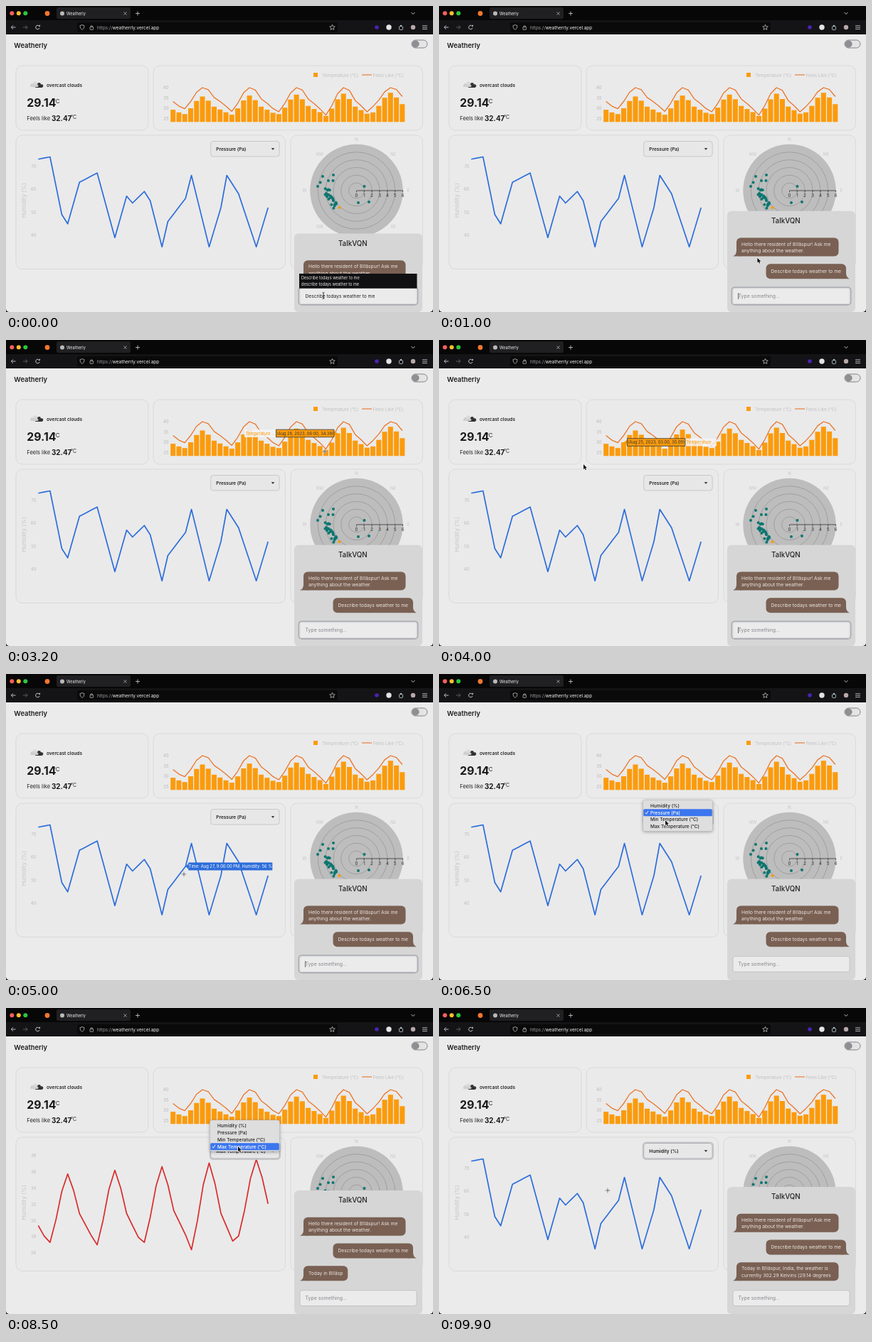
An HTML page with a canvas that plays this animation: 600 px wide and 431 px high, repeating every 10000 ms.

```html
<!DOCTYPE html>
<html lang="en">
<head>
<meta charset="utf-8">
<title>Weatherly</title>
<style>
html, body { margin: 0; width: 100%; height: 100%; overflow: hidden; background: #ebebeb; }
canvas { display: block; width: 600px; height: 431px; }
</style>
</head>
<body>
<canvas id="stage"></canvas>
<script>
const canvas = document.getElementById('stage');
const dpr = window.devicePixelRatio || 1;
canvas.width = Math.round(600 * dpr);
canvas.height = Math.round(431 * dpr);
const c = canvas.getContext('2d');
const LOOP = 10000, STEP = 100, COUNT = 40;
const ORANGE = '#fb9b0c', EMBER = '#e8762a', TEAL = '#0d7670', BLUE = '#2d6ddb', RED = '#d92b2b', BROWN = '#796053';

// eight samples a day: a daily shape between that day's low and high
function daily(lows, high, shape) {
  return Array.from({ length: COUNT }, (_, i) => {
    const day = Math.floor((i + 6) / 8);
    return lows[day] + (high(day) - lows[day]) * shape[(i + 6) % 8];
  });
}
const temps = daily([27.3, 27.3, 27, 27.3, 26.4, 28.1], d => 35.3 + 0.45 * d, [0, 0.33, 0.746, 1, 0.76, 0.42, 0.26, 0.1]);
const feels = daily([29.9, 29.9, 28.6, 28.4, 26.8, 30.9], () => 40, [0, 0.34, 0.78, 1, 0.9, 0.53, 0.34, 0.12]);

// turning points of the humidity curve: index, percent
const turns = [[0, 73], [2, 74], [4, 49], [5, 45], [7, 63], [10, 67], [13, 39], [15, 57], [16, 54], [18, 59], [19, 55],
  [21, 35], [22, 46], [25, 56], [26, 66], [29, 35], [31, 52], [32, 66], [34, 58], [37, 35], [39, 52]];
const humid = Array.from({ length: COUNT }, (_, i) => along(turns, i)[0]);

let seed = 11;
const rnd = () => (seed = seed * 16807 % 2147483647) / 2147483647;
const wind = [[441.6, 248.4], [445, 240], [460, 238], [459.5, 246], [453, 246], [438, 254], [503.5, 254], [495, 277], [510, 276]];
for (let i = 0; i < 24; i++) {
  const u = rnd();
  wind.push([449 + 13 * u + 6 * (rnd() - 0.5), 260 + 20 * u + 14 * (rnd() - 0.5)]);
}

const options = ['Humidity (%)', 'Pressure (Pa)', 'Min Temperature (°C)', 'Max Temperature (°C)'];
const prompt = 'Describe todays weather to me';
const greeting = ['Hello there resident of Bīlāspur! Ask me', 'anything about the weather.'];
const answer = ['Today in Bīlāspur, India, the weather is', 'currently 302.29 Kelvins (29.14 degrees'];

// pointer stops: time, x, y
const path = [[0, 446, 408], [700, 446, 408], [1600, 450, 248], [2000, 438, 256], [2700, 520, 155], [3200, 448, 157],
  [3900, 262, 150], [4200, 85, 225], [4900, 249, 279], [5000, 250, 282], [5800, 335, 202], [6400, 319, 197],
  [6500, 318, 206], [6800, 318, 206], [7400, 328, 197], [7800, 328, 206], [8400, 326, 195], [8600, 326, 195],
  [9100, 322, 167], [9900, 237, 257]];
// menu openings: from, to, checked option
const menus = [[6000, 6800, 1], [7300, 7800, 2], [8400, 9100, 3]];

const px = i => 45.3 + i * 8.28;
const bx = i => 234.7 + i * 8.26;
const tempY = v => 115 + (40 - v) * 2.93;
const humidY = v => 225.5 + (70 - v) * 3.25;
const redY = v => 208 + (38 - v) * 11.42;

// linear values between stops whose first entry is the position
function along(stops, at) {
  const k = Math.max(1, stops.findIndex(s => s[0] >= at));
  const a = stops[k - 1], b = stops[k], u = Math.max(0, (at - a[0]) / (b[0] - a[0]));
  return a.slice(1).map((v, i) => v + (b[i + 1] - v) * u);
}
function pointer(t) {
  const [x, y] = along(path, t);
  return { x, y };
}
function text(s, x, y, size, color, weight = 400, align = 'left') {
  c.font = `${weight} ${size}px Inter, Roboto, sans-serif`;
  c.textAlign = align;
  c.textBaseline = 'alphabetic';
  c.fillStyle = color;
  c.fillText(s, x, y + size * 0.36);
  return c.measureText(s).width;
}
function paint(fill, stroke, lw) {
  if (fill) { c.fillStyle = fill; c.fill(); }
  if (stroke) { c.strokeStyle = stroke; c.lineWidth = lw; c.stroke(); }
}
function box(x, y, w, h, r, fill, stroke, lw = 1) {
  c.beginPath();
  c.roundRect(x, y, w, h, r);
  paint(fill, stroke, lw);
}
function dot(x, y, r, fill, stroke, lw = 1) {
  c.beginPath();
  c.arc(x, y, r, 0, 7);
  paint(fill, stroke, lw);
}
function line(pts, color, lw = 1) {
  c.beginPath();
  pts.forEach(p => c.lineTo(p[0], p[1]));
  c.lineJoin = 'round';
  paint(null, color, lw);
}
function poly(pts, fill) {
  c.beginPath();
  pts.forEach(p => c.lineTo(p[0], p[1]));
  paint(fill);
}
function plus(x, y, r, color, lw) {
  line([[x - r, y], [x + r, y]], color, lw);
  line([[x, y - r], [x, y + r]], color, lw);
}
function nearest(n, dist) {
  let best = 0;
  for (let i = 1; i < n; i++) if (dist(i) < dist(best)) best = i;
  return best;
}
function stamp(i) {
  const d = new Date(2023, 7, 24, 18 + 3 * i), h = d.getHours();
  return { day: 'Aug ' + d.getDate(), clock: `${h % 12 || 12}:00:00 ${h < 12 ? 'AM' : 'PM'}`, h24: String(h).padStart(2, '0') + ':00' };
}
const zone = (p, x0, y0, x1, y1) => p.x >= x0 && p.x <= x1 && p.y >= y0 && p.y <= y1;
const overBars = p => zone(p, 231, 108, 561, 164);
const overLine = p => zone(p, 43, 205, 370, 345) && !zone(p, 287, 190, 385, 212);
const overPolar = (p, top) => zone(p, 405, 190, 585, top);

function arrow(x, y, dir, color) {
  line([[x - 3 * dir, y], [x + 3 * dir, y]], color, 0.9);
  line([[x + 0.5 * dir, y - 2.7], [x + 3.2 * dir, y], [x + 0.5 * dir, y + 2.7]], color, 0.9);
}

function browser() {
  const ink = '#d4d4d6';
  c.fillStyle = '#070708';
  c.fillRect(0, 0, 600, 40);
  c.fillStyle = '#141416';
  c.fillRect(0, 20, 600, 20);
  ['#f9605a', '#fbbd2e', '#2ac840'].forEach((k, i) => dot(8.3 + i * 9.5, 10.3, 3, k));
  dot(58, 10.5, 3.4, '#f2762e');
  box(71, 2, 104, 16, 2.5, '#202022');
  dot(79, 10.5, 3, '#b9b9b9');
  text('Weatherly', 85, 10.5, 5.6, '#f0f0f0');
  line([[165.5, 8.5], [169.5, 12.5]], ink, 0.7);
  line([[169.5, 8.5], [165.5, 12.5]], ink, 0.7);
  plus(185, 10.5, 3, ink, 0.8);
  line([[569.5, 9], [572, 11.5], [574.5, 9]], ink, 0.9);
  arrow(10.5, 30, -1, ink);
  arrow(27, 30, 1, '#66666a');
  c.beginPath();
  c.arc(44.5, 30, 2.8, 0.3, 5.6);
  paint(null, ink, 0.9);
  poly([[45.5, 28.8], [48, 28.8], [48, 26.2]], ink);
  box(100, 23, 366, 14, 2.5, '#0a0a0b');
  line([[107, 26.6], [110, 27.6], [109.5, 31], [107, 33.6], [104.5, 31], [104, 27.6], [107, 26.6]], ink, 0.7);
  box(118, 29.5, 4.6, 3.8, 0.7, null, ink, 0.7);
  c.beginPath();
  c.arc(120.3, 29.2, 1.5, Math.PI, 0);
  paint(null, ink, 0.7);
  const w = text('https://', 128, 30.2, 6.4, '#9c9ca0');
  text('weatherrly.vercel.app', 128 + w, 30.2, 6.4, '#f4f4f4');
  line(Array.from({ length: 11 }, (_, i) => {
    const a = i * Math.PI / 5, r = i % 2 ? 1.8 : 4;
    return [458.5 + r * Math.sin(a), 30.2 - r * Math.cos(a)];
  }), ink, 0.7);
  dot(521, 30, 2.8, '#4a23b5');
  dot(538, 30, 3.7, '#e4e4e4');
  box(552.5, 28.5, 5, 5, 1, null, '#b8c8c8', 0.9);
  dot(555, 28, 1.2, '#b8c8c8');
  dot(572, 30, 3.2, '#b9a9a9');
  [27.8, 30.2, 32.6].forEach(y => line([[585, y], [592, y]], ink, 0.8));
}

function page() {
  c.fillStyle = '#ebebeb';
  c.fillRect(0, 40, 600, 391);
  text('Weatherly', 11.3, 55.2, 9.4, '#1c1c1e', 600);
  box(570, 48, 22, 11, 5.5, '#e4e4e4', '#77777b', 0.9);
  dot(575.6, 53.5, 4.6, '#8f8f93', '#77777b', 0.6);
  [[14, 84, 186, 91], [207, 84, 378.5, 91], [14, 182, 378.5, 188.5], [400, 182, 185.5, 188.5]]
    .forEach(r => box(...r, 9, '#eaeaea', '#d7d7d7', 0.9));
  box(40, 110.3, 12.3, 4.6, 2.3, '#333');
  dot(46.5, 110.5, 2.4, '#333');
  dot(37, 111.3, 2.4, '#cfcfcf');
  dot(41, 109.6, 3, '#dadada');
  box(34, 110.8, 11.5, 3.2, 1.6, '#cfcfcf');
  text('overcast clouds', 57, 112, 6.5, '#222', 600);
  text('29.14', 29.3, 136, 15.8, '#19191b', 700);
  text('°C', 66.3, 134, 8, '#222');
  text('Feels like', 29.3, 158.7, 7.5, '#222');
  text('32.47', 64, 158.3, 9.9, '#19191b', 700);
  text('°C', 91, 156, 7, '#222');
}

function barChart() {
  box(432, 94, 6, 6, 0, ORANGE);
  text('Temperature (°C)', 444, 97.3, 6.25, '#c0c0c0');
  line([[500, 97], [514, 97]], EMBER, 1.1);
  text('Feels Like (°C)', 515.5, 97.3, 6.25, '#c0c0c0');
  [40, 35, 30, 25].forEach(v => text(v, 228.5, tempY(v), 6, '#b8b8b8', 400, 'right'));
  temps.forEach((v, i) => box(bx(i) - 3.5, tempY(v), 7, 163.3 - tempY(v), 0, ORANGE));
  line(feels.map((v, i) => [bx(i), tempY(v)]), EMBER, 1.3);
}

function lineChart(red) {
  c.save();
  c.translate(25.5, 274);
  c.rotate(-Math.PI / 2);
  text('Humidity (%)', 0, 0, 8, '#c6c6c6', 400, 'center');
  c.restore();
  const [from, to, step] = red ? [26, 38, 2] : [40, 70, 10];
  const y = red ? redY : humidY;
  for (let v = from; v <= to; v += step) text(v, 42.5, y(v), 6, '#bcbcbc', 400, 'right');
  line((red ? temps : humid).map((v, i) => [px(i), y(v)]), red ? RED : BLUE, 1.7);
}

function polarChart() {
  dot(492.5, 260, 65.2, '#bdbdbd');
  for (let k = 1; k < 6; k++) dot(492.5, 260, k * 10.85, null, '#808083', 0.5);
  ['N', 'NE', 'E', 'SE', 'S', 'SW', 'W', 'NW'].forEach((s, i) => {
    const a = i * Math.PI / 4;
    text(s, 492.5 + 73 * Math.sin(a), 260 - 72 * Math.cos(a), 6, '#c6c6c6', 400, 'center');
  });
  line([[492.5, 260], [558, 260]], '#333', 0.8);
  for (let k = 0; k < 7; k++) {
    const x = 492.5 + k * 10.85;
    line([[x, 260], [x, 262.5]], '#333', 0.7);
    text(k, x, 267, 6, '#2a2a2a', 400, 'center');
  }
  wind.forEach(p => dot(p[0], p[1], 2, TEAL));
  dot(468.5, 284, 2.1, ORANGE);
}

function select(label, focus) {
  if (focus) box(286.5, 189.3, 98.8, 24, 4.5, null, '#c6c6ca', 1.6);
  box(287.7, 190.5, 96.4, 21.5, 3.5, '#e7e7e8', focus ? '#a9a9ae' : '#c3c3c8', 0.9);
  text(label, 295.3, 201.5, 6.5, '#222', 600);
  poly([[372.7, 200.3], [377.3, 200.3], [375, 202.8]], '#222');
}

function menu(sel, y) {
  const top = 187.3 - sel * 9.8;
  c.save();
  c.shadowColor = 'rgba(0,0,0,.35)';
  c.shadowBlur = 4;
  c.shadowOffsetY = 1;
  box(286.5, top, 98, 44, 3, '#dedede');
  c.restore();
  box(286.5, top, 98, 44, 3, null, '#b5b5b5', 0.5);
  const hot = Math.max(0, Math.min(3, Math.floor((y - top - 2.5) / 9.8)));
  options.forEach((s, i) => {
    const cy = top + 7.9 + i * 9.8, ink = i === hot ? '#fff' : '#222';
    if (i === hot) box(287.2, cy - 5, 96.6, 10, 1.5, '#3c76ee');
    if (i === sel) line([[290, cy], [291.4, cy + 2], [294, cy - 2.4]], ink, 0.9);
    text(s, 297, cy, 6.5, ink, 500);
  });
}

const tall = m => m.lines.length > 1 ? 26 : 21;

function bubble(m, bottom) {
  const { lines, right } = m, h = tall(m);
  c.font = '400 6.7px Inter, Roboto, sans-serif';
  const w = lines.length > 1 ? 143.5 : Math.min(143.5, c.measureText(lines[0]).width + 14);
  const x = right ? 572 - w : 418, y = bottom - h;
  const edge = right ? 572 : 418, side = right ? 1 : -1;
  box(x, y, w, h, 6, BROWN);
  c.beginPath();
  c.moveTo(edge, bottom - 8);
  c.quadraticCurveTo(edge, bottom - 2, edge + 5 * side, bottom);
  c.lineTo(edge - 7 * side, bottom);
  c.fill();
  lines.forEach((l, i) => text(l, x + 7, y + (lines.length > 1 ? 8.6 + i * 9.2 : 10), 6.7, '#ece6e2'));
}

function chat(t, sent, focus) {
  const chars = Math.floor(15.001 + (t - 8500) * 64 / 1400);
  const talk = [{ lines: greeting }];
  if (sent) talk.push({ lines: [prompt], right: true });
  if (chars > 0) talk.push({ lines: [answer[0].slice(0, chars), answer[1].slice(0, Math.max(0, chars - 40))].filter(Boolean) });
  const top = talk.reduce((y, m) => y - tall(m) - 10.8, 357.3);
  box(405, top, 180, 431 - top, 6, '#d6d6d6');
  text('TalkVQN', 487.3, top + 13.7, 9.8, '#222', 500, 'center');
  let bottom = 384.3;
  for (const m of talk.reverse()) {
    bubble(m, bottom);
    bottom -= tall(m) + 10.8;
  }
  if (focus) box(411.5, 396.3, 167, 24.6, 4, '#fff', '#a9abb1', 1.8);
  box(413, 397.7, 164, 21.8, 3, '#ebebeb', focus ? '#d0d0d4' : '#bdbdc2', 0.8);
  if (sent) {
    text('Type something...', 420.5, 408.7, 6.95, '#85878d');
    if (focus && (t + 300) % 1000 < 500) line([[420.6, 404.5], [420.6, 413]], '#222', 0.7);
  } else {
    text(prompt, 420.5, 408.5, 6.65, '#222');
    box(412, 377, 165.5, 20.7, 0, '#111113');
    text(prompt, 415, 383, 5.55, '#ededed');
    text(prompt.toLowerCase(), 415, 392.3, 5.55, '#ededed');
  }
  return top;
}

function polarTip(p) {
  const dist = i => Math.hypot(wind[i][0] - p.x, wind[i][1] - p.y);
  const k = nearest(wind.length, dist);
  if (dist(k) > 10) return;
  const [x, y] = wind[k], dx = x - 492, dy = y - 260, s = stamp((36 + 7 * k) % COUNT);
  const r = Math.hypot(dx, dy) / 10.85;
  const deg = Math.round((Math.atan2(dx, -dy) * 180 / Math.PI + 360) % 360);
  poly([[x + 1, y], [x + 6, y - 4], [x + 6, y + 4]], TEAL);
  box(x + 5.5, y - 13.2, 57, 26.2, 0, TEAL);
  [`r: ${r.toFixed(2)}`, `θ: ${deg}°`, `${s.day}, ${s.clock}`]
    .forEach((l, i) => text(l, x + 7.6, y - 8.3 + i * 7.8, 5.8, '#fff'));
}

function barTip(p) {
  const i = nearest(COUNT, k => Math.abs(bx(k) - p.x)), y = tempY(temps[i]), s = stamp(i);
  if (p.y < y) return;
  const flip = bx(i) > 445, x = flip ? bx(i) - 86.5 : bx(i) + 5;
  const nameX = flip ? x - 44.5 : x + 81.5, tip = flip ? x + 81.5 : x;
  box(nameX, y - 5.5, 44, 11, 0, 'rgba(245,245,245,.85)');
  text('Temperature ...', nameX + 1.8, y, 5.8, ORANGE);
  poly([[bx(i), y], [tip, y - 3.5], [tip, y + 3.5]], ORANGE);
  box(x, y - 5.3, 81.5, 10.6, 0, ORANGE, '#333', 0.8);
  text(`(${s.day}, 2023, ${s.h24}, ${temps[i].toFixed(2)})`, x + 40.7, y, 5.8, '#333', 400, 'center');
}

function lineTip(p, red) {
  const i = nearest(COUNT, k => Math.abs(px(k) - p.x)), x = px(i), v = red ? temps[i] : humid[i];
  const y = red ? redY(v) : humidY(v), s = stamp(i), ink = red ? RED : BLUE;
  if (Math.abs(y - p.y) > 25) return;
  const flip = x > 262, left = flip ? x - 122 : x + 4, tip = flip ? left + 118 : left;
  poly([[x, y], [tip, y - 4], [tip, y + 4]], ink);
  box(left, y - 5.4, 118, 10.8, 0, ink);
  text(`Time: ${s.day}, ${s.clock}, Humidity: ${Math.round(v)} %`, left + 59, y, 5.85, '#fff', 400, 'center');
}

function drawPointer(p, open, top) {
  const { x, y } = p;
  if (!open && zone(p, 411, 396, 579, 421)) {
    line([[x, y - 4], [x, y + 4]], '#111', 0.8);
    [-4.2, 4.2].forEach(d => line([[x - 1.5, y + d], [x + 1.5, y + d]], '#111', 0.7));
  } else if (!open && (overBars(p) || overLine(p) || overPolar(p, top))) {
    plus(x, y, 3.3, '#fff', 1.4);
    plus(x, y, 3.3, '#333', 0.7);
  } else {
    const a = [[0, 0], [0, 7.2], [1.7, 5.7], [2.8, 8.2], [4, 7.7], [2.9, 5.3], [5.1, 5.2], [0, 0]].map(q => [x + q[0], y + q[1]]);
    line(a, '#fff', 1.2);
    poly(a, '#111');
  }
}

function draw(t) {
  c.setTransform(dpr, 0, 0, dpr, 0, 0);
  const lag = pointer(t - STEP), picked = t >= menus[0][0];
  const open = menus.find(m => t >= m[0] && t < m[1]);
  const choice = (menus.find(m => t < m[1]) || [0, 0, 0])[2];
  const red = choice > 1;
  browser();
  page();
  barChart();
  lineChart(red);
  select(options[choice], picked);
  polarChart();
  const top = chat(t, t >= 600, !picked);
  if (open) menu(open[2], lag.y);
  else if (overPolar(lag, top)) polarTip(lag);
  else if (overBars(lag)) barTip(lag);
  else if (overLine(lag)) lineTip(lag, red);
  drawPointer(pointer(t), open, top);
  poly([[0, 427], [1, 429.5], [4, 431], [0, 431]], '#222');
  poly([[600, 427], [599, 429.5], [596, 431], [600, 431]], '#222');
}

const start = performance.now();
function frame() {
  const t = (performance.now() - start) % LOOP;
  draw(Math.floor(t / STEP) * STEP);
  requestAnimationFrame(frame);
}
frame();
</script>
</body>
</html>
```
